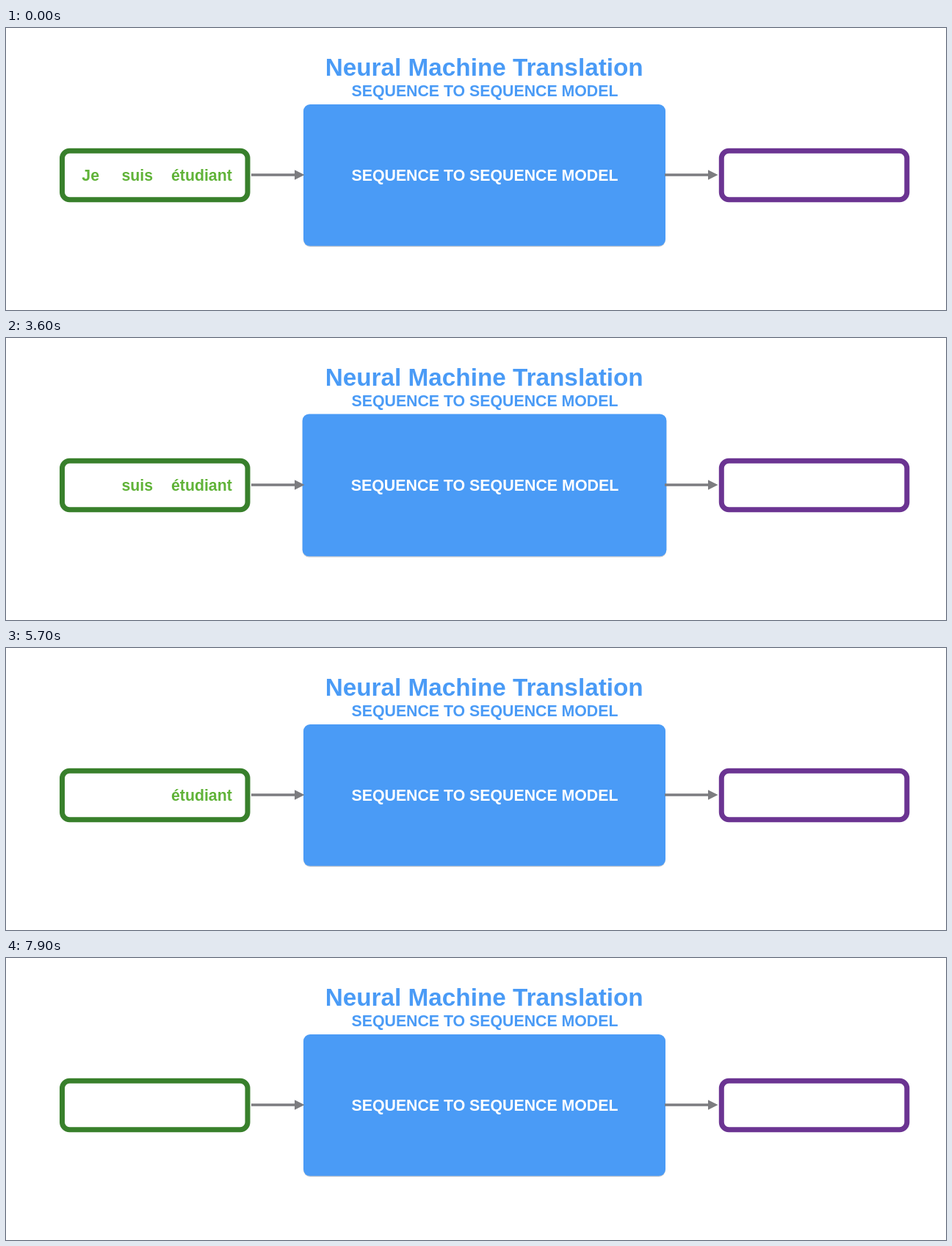
These frames come from a looping animation (1280 by 384 pixels, 8000 ms). An HTML page:

```html
<!DOCTYPE html>
<html lang="en">
<head>
<meta charset="utf-8">
<title>Sequence to sequence model</title>
<style>
  html, body { margin: 0; width: 100%; height: 100%; overflow: hidden; background: #fff; }
  svg { display: block; width: 100vw; height: 100vh; }
  text { font: bold 21.3px "Liberation Sans", Arial, sans-serif; text-anchor: middle; }
  .title { font-size: 33.3px; }
  .blue { fill: #4a9bf6; }
  .word { fill: #60b338; }
  .box { fill: none; stroke-width: 7; }
  .arrow { fill: #7c7c80; }
</style>
</head>
<body>
<svg viewBox="0 0 1280 384">
  <text class="title blue" x="651.2" y="65.3">Neural Machine Translation</text>
  <text class="blue" x="652" y="92.7">SEQUENCE TO SEQUENCE MODEL</text>

  <rect class="box" x="76.5" y="167.3" width="252.5" height="66.4" rx="10" stroke="#38802b"/>
  <rect class="box" x="974.3" y="167.3" width="252.5" height="66.4" rx="10" stroke="#6b3492"/>

  <g id="words">
    <text class="word" y="208">Je</text>
    <text class="word" y="208">suis</text>
    <text class="word" y="208">étudiant</text>
  </g>

  <g id="model">
    <rect x="-246.4" y="-95.4" width="492.8" height="193" rx="9" fill="#8a8f98" opacity=".45"/>
    <rect class="blue" x="-246.5" y="-96.4" width="493" height="192.8" rx="9"/>
    <text x="0.5" y="7.6" fill="#fff">SEQUENCE TO SEQUENCE MODEL</text>
  </g>

  <path class="arrow" d="M334 198.2H393V193.2L406.5 200L393 206.8V201.8H334Z"/>
  <path class="arrow" d="M897 198.2H956V193.2L969.5 200L956 206.8V201.8H897Z"/>
</svg>
<script>
const LOOP = 8000, STEP = 100;
const START = 1905, CYCLE = 2500, MOVE = 1000;
const TARGET = 530;
const homes = [115.2, 178.8, 266.4];
// model scale, by time since a word sets off
const pulse = [[1295, 1], [1555, 1.012], [2065, 0.977], [2495, 1]];

const words = document.querySelectorAll('#words text');
const model = document.getElementById('model');

const clamp = v => Math.min(1, Math.max(0, v));
const ease = u => u * u * (3 - 2 * u);
const mix = (a, b, u) => a + (b - a) * u;

function scaleAt(age) {
  for (let i = 1; i < pulse.length; i++) {
    const [t0, a] = pulse[i - 1], [t1, b] = pulse[i];
    if (age >= t0 && age < t1) return mix(a, b, ease((age - t0) / (t1 - t0)));
  }
  return 1;
}

function draw(t) {
  let scale = 1;
  words.forEach((word, i) => {
    const age = t - START - i * CYCLE;
    const u = clamp(age / MOVE);
    word.setAttribute('x', mix(homes[i], TARGET, ease(u)));
    word.style.visibility = u < 1 ? 'visible' : 'hidden';
    scale *= scaleAt(age);
  });
  model.setAttribute('transform', `translate(651.5 200.4) scale(${scale})`);
}

const begin = performance.now();
function tick() {
  const t = (performance.now() - begin) % LOOP;
  draw(Math.floor(t / STEP) * STEP);
  requestAnimationFrame(tick);
}
tick();
</script>
</body>
</html>
```
